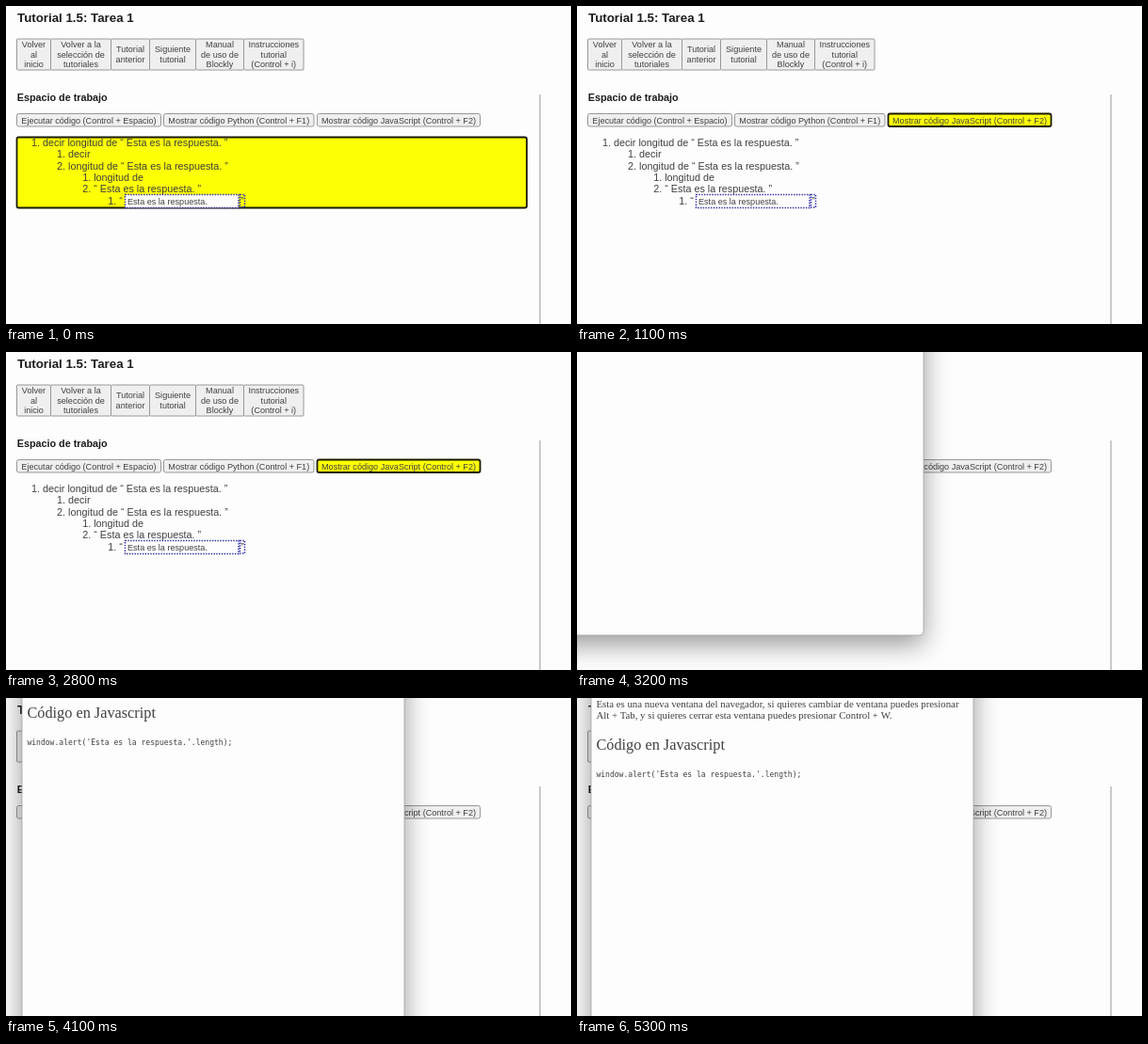
Recreate the animation shown at these times as an HTML page with a canvas. Size 600 by 338 pixels, loop 8 s.

```html
<!DOCTYPE html>
<html lang="es">
<head>
<meta charset="utf-8">
<title>Tutorial 1.5: Tarea 1</title>
<style>
html, body { margin: 0; width: 100%; height: 100%; overflow: hidden; background: #fdfdfd; }
canvas { display: block; width: 600px; height: 338px; }
</style>
</head>
<body>
<canvas id="stage"></canvas>
<script>
const W = 600, H = 338, LOOP = 8000, STEP = 100;
const FOCUS_BUTTON = 1000, OPEN_POPUP = 2900;
const SANS = '"Liberation Sans", Arial, sans-serif';
const SERIF = '"Liberation Serif", "Times New Roman", serif';
const MONO = '"DejaVu Sans Mono", monospace';
const YELLOW = '#fdff05', INK = '#404040', BORDER = '#989898';

const canvas = document.getElementById('stage');
const ctx = canvas.getContext('2d');
const dpr = window.devicePixelRatio || 1;
canvas.width = W * dpr;
canvas.height = H * dpr;

// left edge, right edge, lines
const toolbar = [
  [11.5, 47.5, ['Volver', 'al', 'inicio']],
  [47.5, 111.5, ['Volver a la', 'selección de', 'tutoriales']],
  [111.5, 152.5, ['Tutorial', 'anterior']],
  [152.5, 201.5, ['Siguiente', 'tutorial']],
  [201.5, 252.5, ['Manual', 'de uso de', 'Blockly']],
  [252.5, 316, ['Instrucciones', 'tutorial', '(Control + i)']]
];

const actions = [
  [11.5, 164.5, 'Ejecutar código (Control + Espacio)'],
  [167.5, 327, 'Mostrar código Python (Control + F1)'],
  [330.5, 503.5, 'Mostrar código JavaScript (Control + F2)']
];

// depth, number, text
const outline = [
  [0, 1, 'decir longitud de “ Esta es la respuesta. ”'],
  [1, 1, 'decir'],
  [1, 2, 'longitud de “ Esta es la respuesta. ”'],
  [2, 1, 'longitud de'],
  [2, 2, '“ Esta es la respuesta. ”'],
  [3, 1, '“']
];

// time, right edge of the popup, baseline of its heading
const drag = [
  [3600, 368, -35],
  [3800, 384, -20],
  [4100, 423, 21],
  [4500, 427.5, 45],
  [5300, 421, 55]
];

function text(str, x, y, size, family = SANS, color = INK, align = 'left', weight = '') {
  ctx.font = `${weight} ${size}px ${family}`;
  ctx.fillStyle = color;
  ctx.textAlign = align;
  ctx.fillText(str, x, y);
}

function box(x, y, w, h, r, fill, stroke, line = 1) {
  ctx.beginPath();
  ctx.roundRect(x, y, w, h, r);
  ctx.fillStyle = fill;
  ctx.fill();
  ctx.strokeStyle = stroke;
  ctx.lineWidth = line;
  ctx.stroke();
}

function dotted(x, y, w, h) {
  ctx.setLineDash([1.4, 1.4]);
  ctx.strokeStyle = '#2b2ba8';
  ctx.lineWidth = 1.5;
  ctx.strokeRect(x, y, w, h);
  ctx.setLineDash([]);
}

function drawToolbar() {
  for (const [left, right, lines] of toolbar) {
    box(left, 35, right - left, 33, 1, '#efefef', BORDER);
    const top = 54.5 - (lines.length - 1) * 5.1;
    lines.forEach((s, i) => text(s, (left + right) / 2, top + i * 10.2, 9.1, SANS, INK, 'center'));
  }
}

function drawActions(focused) {
  actions.forEach(([left, right, label], i) => {
    const on = focused && i === 2;
    box(left, 114.5, right - left, 13.5, 2, on ? YELLOW : '#efefef', on ? '#1a1a00' : BORDER, on ? 1.8 : 1);
    text(label, (left + right) / 2, 124.5, 9.1, SANS, INK, 'center');
  });
}

function drawWorkspace(focused) {
  if (focused) box(11.5, 139.5, 541.5, 75, 2, YELLOW, '#1a1a00', 1.8);
  outline.forEach(([depth, n, label], i) => {
    const x = 39 + depth * 27.1, y = 149 + i * 12.36;
    text(n + '.', x - 3, y, 10.8, SANS, INK, 'right');
    text(label, x, y, 10.8);
  });
  ctx.fillStyle = '#fefefe';
  ctx.fillRect(126.5, 200.5, 120.5, 14);
  dotted(126.5, 200.5, 120.5, 14);
  text('Esta es la respuesta.', 129, 210.7, 9.1);
  text('”', 249.2, 210.8, 10.8);
  dotted(248.5, 200.5, 5, 13.5);
}

function drawPage(t) {
  ctx.fillStyle = '#fdfdfd';
  ctx.fillRect(0, 0, W, H);
  text('Tutorial 1.5: Tarea 1', 12, 17, 13.3, SANS, '#1c1c1c', 'left', 'bold');
  drawToolbar();
  text('Espacio de trabajo', 11.7, 100.7, 10.8, SANS, '#1c1c1c', 'left', 'bold');
  drawActions(t >= FOCUS_BUTTON && t < OPEN_POPUP);
  drawWorkspace(t < FOCUS_BUTTON);
  ctx.fillStyle = '#b4b4b4';
  ctx.fillRect(566.3, 94, 1.4, H - 94);
}

function popupPosition(t) {
  const last = drag[drag.length - 1];
  if (t <= drag[0][0]) return drag[0].slice(1);
  if (t >= last[0]) return last.slice(1);
  const i = drag.findIndex(k => k[0] > t);
  const [t0, x0, y0] = drag[i - 1], [t1, x1, y1] = drag[i];
  const p = (t - t0) / (t1 - t0);
  return [x0 + (x1 - x0) * p, y0 + (y1 - y0) * p];
}

function drawPopup(t) {
  const [right, base] = popupPosition(t);
  const left = right - 406, bottom = base + 336, x = left + 5.4;
  ctx.save();
  ctx.shadowColor = 'rgba(0, 0, 0, 0.4)';
  ctx.shadowBlur = 28 * dpr;
  ctx.shadowOffsetY = 10 * dpr;
  ctx.beginPath();
  ctx.roundRect(left, bottom - 560, 406, 560, 4);
  ctx.fillStyle = '#fdfdfd';
  ctx.fill();
  ctx.restore();
  ctx.strokeStyle = '#a4a4a4';
  ctx.lineWidth = 0.8;
  ctx.stroke();
  text('Esta es una nueva ventana del navegador, si quieres cambiar de ventana puedes presionar', x, base - 45.3, 10.8, SERIF);
  text('Alt + Tab, y si quieres cerrar esta ventana puedes presionar Control + W.', x, base - 32.8, 10.8, SERIF);
  text('Código en Javascript', x, base, 16.3, SERIF);
  text("window.alert('Esta es la respuesta.'.length);", x, base + 28.6, 8.06, MONO);
}

const start = performance.now();

function frame(now) {
  const elapsed = Math.max(0, now - start) % LOOP;
  const t = Math.floor(elapsed / STEP) * STEP;
  ctx.setTransform(dpr, 0, 0, dpr, 0, 0);
  drawPage(t);
  if (t >= OPEN_POPUP) drawPopup(t);
  requestAnimationFrame(frame);
}
requestAnimationFrame(frame);
</script>
</body>
</html>
```
